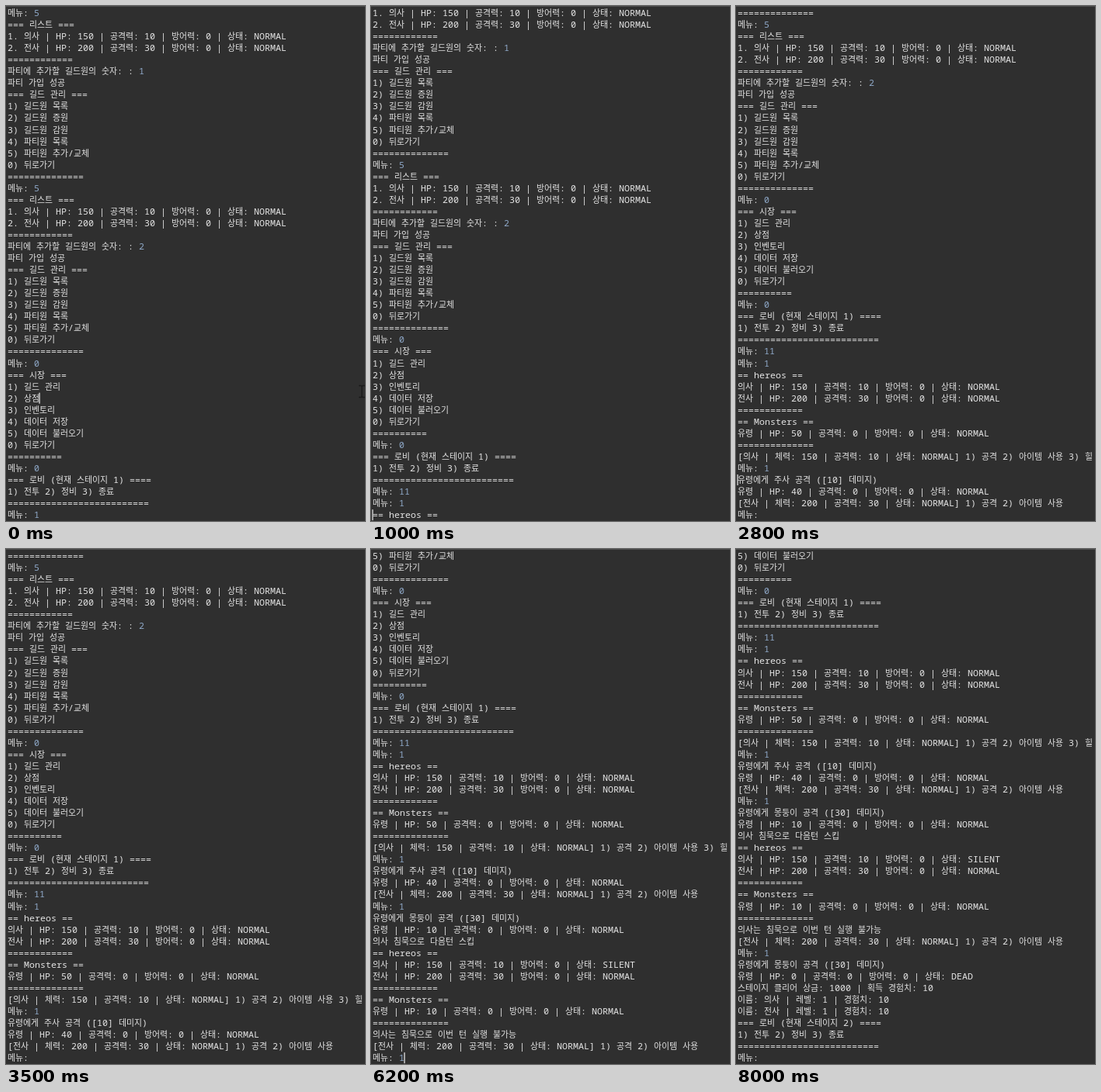
Animation of 462x664 px, one loop 8.2 s. Source, as an HTML page:

```html
<!DOCTYPE html>
<html lang="ko">
<head>
<meta charset="utf-8">
<style>
html, body { margin: 0; width: 100%; height: 100%; overflow: hidden; background: #2f2f2f; }
svg { display: block; width: 462px; height: 664px; }
text { fill: #e4e4e4; font: 11.67px "Noto Sans Mono", "DejaVu Sans Mono", monospace; }
.ko { font: 10.9px "Noto Sans CJK KR", "Noto Sans CJK", "Noto Sans CJK JP", sans-serif; }
.in { fill: #8fa9c9; }
</style>
</head>
<body>
<svg viewBox="0 0 462 664">
  <rect width="462" height="664" fill="#2f2f2f"/>
  <rect width="462" height="1" fill="#4c4c4c"/>
  <g id="screen"></g>
  <rect id="caret" width="1.2" height="14" fill="#f0f0f0"/>
  <path id="pointer" d="M454 489.500h3l1 1l1-1h3M458 490v14M454 504.500h3l1-1l1 1h3" fill="none" stroke="#1b1b1b" stroke-width="1.500"/>
</svg>
<script>
const LOOP = 8200, STEP = 100, BLINK = 530;
const ROWS = 43, PITCH = 15.05, LEFT = 2, BASELINE = 13;
const HANGUL = /[가-힣]/;

const bar = n => '='.repeat(n);
const stats = (name, hp, atk, state = 'NORMAL') =>
  `${name} | HP: ${hp} | 공격력: ${atk} | 방어력: 0 | 상태: ${state}`;
const turn = (name, hp, atk, extra = '') =>
  `[${name} | 체력: ${hp} | 공격력: ${atk} | 상태: NORMAL] 1) 공격 2) 아이템 사용${extra}`;
// "~" marks the start of user input
const menu = n => `메뉴: ~${n}`;
const join = n => [
  menu(5), '=== 리스트 ===',
  '1. ' + stats('의사', 150, 10), '2. ' + stats('전사', 200, 30), bar(12),
  `파티에 추가할 길드원의 숫자: : ~${n}`, '파티 가입 성공', '=== 길드 관리 ===',
  '1) 길드원 목록', '2) 길드원 증원', '3) 길드원 감원',
  '4) 파티원 목록', '5) 파티원 추가/교체', '0) 뒤로가기', bar(14)];
const lobby = n => [`=== 로비 (현재 스테이지 ${n}) ====`, '1) 전투 2) 정비 3) 종료', bar(26)];
const field = (state, hp) => [
  '== hereos ==', stats('의사', 150, 10, state), stats('전사', 200, 30), bar(12),
  '== Monsters ==', stats('유령', hp, 0), bar(14)];
const clubHit = '유령에게 몽둥이 공격 ([30] 데미지)';
const reward = name => `이름: ${name} | 레벨: 1 | 경험치: 10`;

const log = [
  ...join(1), ...join(2), menu(0),
  '=== 시장 ===', '1) 길드 관리', '2) 상점', '3) 인벤토리',
  '4) 데이터 저장', '5) 데이터 불러오기', '0) 뒤로가기', bar(10), menu(0),
  ...lobby(1), menu(11), menu(1),
  ...field('NORMAL', 50), turn('의사', 150, 10, ' 3) 힐'), menu(1),
  '유령에게 주사 공격 ([10] 데미지)', stats('유령', 40, 0), turn('전사', 200, 30), menu(1),
  clubHit, stats('유령', 10, 0), '의사 침묵으로 다음턴 스킵',
  ...field('SILENT', 10), '의사는 침묵으로 이번 턴 실행 불가능', turn('전사', 200, 30), menu(1),
  clubHit, stats('유령', 0, 0, 'DEAD'), '스테이지 클리어 상금: 1000 | 획득 경험치: 10',
  reward('의사'), reward('전사'), ...lobby(2), menu('')];

// last: bottom line, typed: its input so far, caret: [line, at line end]
const events = [
  { at: 0, last: 43, typed: '1', caret: [33, true] },
  { at: 100, last: 43, typed: '11', caret: [43, true] },
  { at: 300, last: 44, typed: '', caret: [44, false] },
  { at: 700, last: 44, typed: '1', caret: [44, true] },
  { at: 970, last: 45, typed: '', caret: [45, false] },
  { at: 1100, last: 53, typed: '' },
  { at: 2200, last: 53, typed: '1', caret: [53, true] },
  { at: 2600, last: 57, typed: '', caret: [54, false] },
  { at: 4500, last: 57, typed: '1', caret: [57, true] },
  { at: 4900, last: 61, typed: '', caret: [58, false] },
  { at: 5000, last: 70, typed: '' },
  { at: 6200, last: 70, typed: '1', caret: [70, true] },
  { at: 6400, last: 79, typed: '', caret: [71, false] }];

const screen = document.getElementById('screen');
const caret = document.getElementById('caret');
const pointer = document.getElementById('pointer');

const advance = c => c === '~' ? 0 : HANGUL.test(c) ? 10 : 7;
const width = s => [...s].reduce((sum, c) => sum + advance(c), 0);

// Terminal cells: Hangul and Latin each keep a fixed advance
function lineMarkup(line, y) {
  const inputStart = line.indexOf('~');
  return [...line.matchAll(/[가-힣]+|[^가-힣\s~]+/g)].map(({ 0: run, index }) => {
    const cells = [...run].map((_, i) => LEFT + width(line.slice(0, index + i)));
    const kind = HANGUL.test(run) ? 'ko' : inputStart >= 0 && index > inputStart ? 'in' : '';
    return `<text class="${kind}" x="${cells.join(' ')}" y="${y.toFixed(2)}">${run}</text>`;
  }).join('');
}

let shown;
function render(time) {
  const t = Math.floor((time % LOOP) / STEP) * STEP;
  const past = events.filter(e => e.at <= t);
  const now = past[past.length - 1];
  const top = now.last - ROWS;
  const lineAt = i => i === now.last ? log[i].replace(/~.*/, '~' + now.typed) : log[i];

  if (shown !== now) {
    shown = now;
    let markup = '';
    for (let i = top; i <= now.last; i++) markup += lineMarkup(lineAt(i), BASELINE + (i - top) * PITCH);
    screen.innerHTML = markup;
  }

  const mark = past.filter(e => e.caret).pop();
  const [line, atEnd] = mark.caret;
  caret.setAttribute('x', atEnd ? LEFT + width(lineAt(line)) - 0.5 : 1.5);
  caret.setAttribute('y', BASELINE - 11 + (line - top) * PITCH);
  caret.style.display = Math.floor((t - mark.at) / BLINK) % 2 ? 'none' : '';
  pointer.style.display = t < 1000 ? '' : 'none';
}

const start = performance.now();
function tick() {
  render(performance.now() - start);
  requestAnimationFrame(tick);
}
tick();
</script>
</body>
</html>
```
